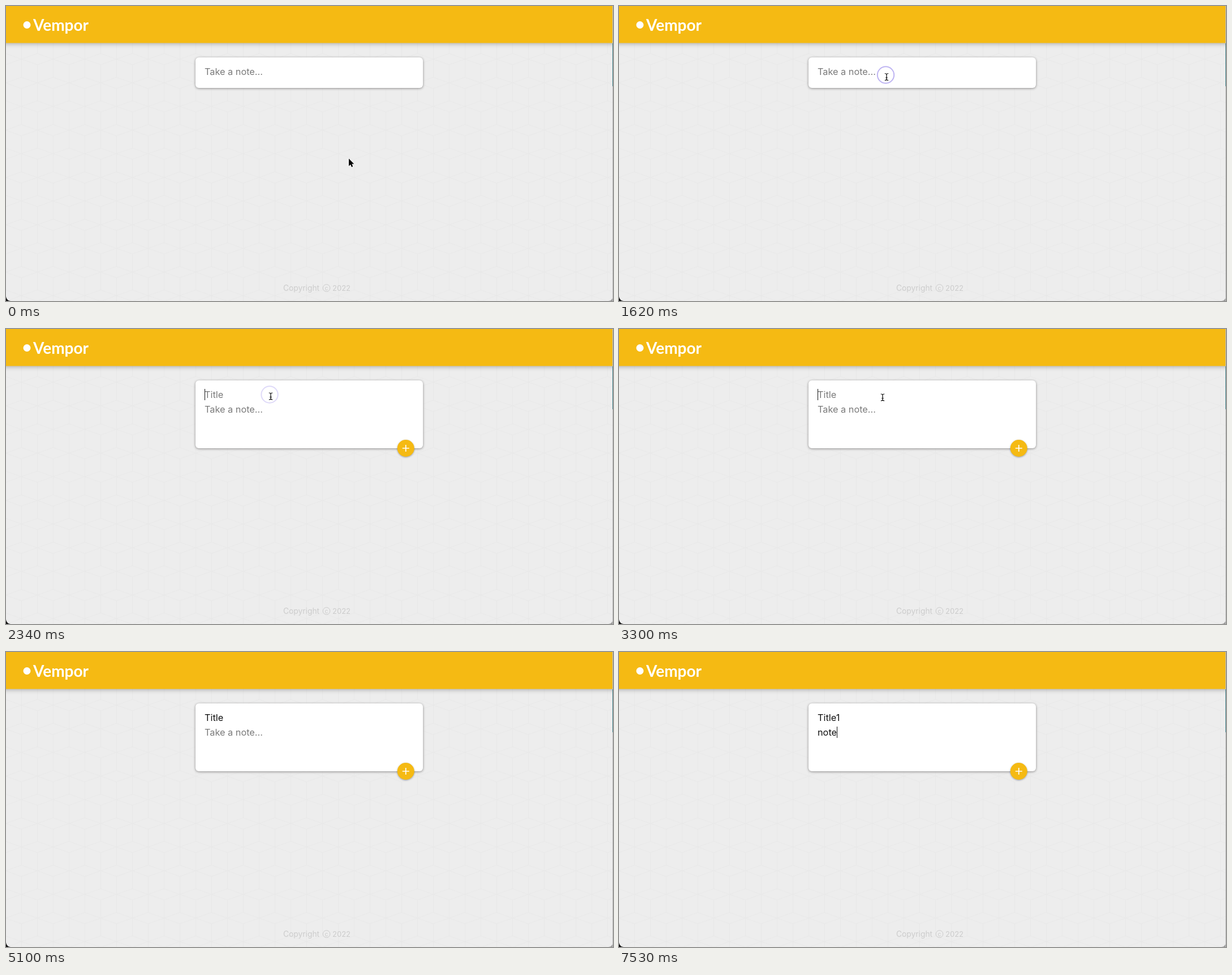
An HTML page for the animation above (8000 ms loop, 1073 by 522 pixels).

```html
<!DOCTYPE html>
<html lang="en">
<head>
<meta charset="utf-8">
<title>Notes</title>
<style>
  html, body { margin: 0; width: 100%; height: 100%; overflow: hidden; background: #ededed; }
  svg { display: block; width: 1073px; height: 522px; }
  text { font: 16.3px Inter, "Open Sans", sans-serif; white-space: pre; }
  .brand { font: 700 28px Lato, sans-serif; fill: #fff; }
  .foot text { font-size: 13.8px; fill: #ccc; }
  #header { filter: drop-shadow(0 1px 4px rgba(0,0,0,.3)); }
  #card { filter: drop-shadow(0 1px 2px rgb(138,137,137)); }
  #add circle { filter: drop-shadow(0 1px 1.5px rgba(0,0,0,.35)); }
</style>
</head>
<body>
<svg viewBox="0 0 1073 522">
  <defs>
    <pattern id="cubes" x="27" y="79" width="56" height="83.7" patternUnits="userSpaceOnUse">
      <path d="M0 15L28.5 5 56 15 28.5 25ZM28.5 57L0 47M28.5 57L0 67M28.5 57L56 47M28.5 57L56 67
               M.5 0V47M.5 67V84M28.5 0V5M28.5 25V84" fill="none" stroke="#e8e8e8"/>
    </pattern>
  </defs>
  <rect width="1073" height="522" fill="#ededed"/>
  <rect width="1073" height="522" fill="url(#cubes)"/>
  <rect id="header" x="-10" y="-10" width="1093" height="75.5" fill="#f5ba13"/>
  <circle cx="37" cy="33.5" r="6.5" fill="#fff"/>
  <text class="brand" x="48" y="44">Vempor</text>

  <g class="foot">
    <text x="490" y="504">Copyright</text>
    <circle cx="566.5" cy="499" r="6.3" fill="none" stroke="#ccc"/>
    <text x="566.5" y="502.5" text-anchor="middle" style="font-size:10.5px">c</text>
    <text x="577" y="504" style="font-size:13px">2022</text>
  </g>
  <path d="M0 514Q1 521 8 522H0Z" fill="#111"/>
  <path d="M1073 514Q1072 521 1065 522H1073Z" fill="#999"/>
  <path d="M1072.5 0V522" stroke="#bbb"/>
  <path d="M1072.5 66V142" stroke="#3f7f86"/>

  <rect id="card" x="335" y="91" width="402" height="54" rx="6" fill="#fff"/>
  <text id="title" x="351" y="122"></text>
  <text id="note" x="351" y="148"></text>
  <rect id="caret" width="1" height="20" fill="#111"/>
  <g id="add">
    <circle r="15" fill="#f5ba13"/>
    <path d="M-6 0H6M0-6V6" stroke="#fff" stroke-width="1.7"/>
  </g>
  <circle id="ring" r="14.7" fill="#fff" fill-opacity=".5" stroke="#beb4f2" stroke-width="2"/>
  <path id="arrow" d="M0 0V13.2L3 10.5 5 15 7.2 14 5.3 9.6H9.3Z" fill="#000" stroke="#fff" stroke-width="1.1" paint-order="stroke"/>
  <g id="beam" fill="none">
    <path id="stem" d="M-3.2-6Q-.5-6 0-4.8Q.5-6 3.2-6M-3.2 6Q-.5 6 0 4.8Q.5 6 3.2 6M0-5V5M-1.7 1.5H1.7" stroke="#fff" stroke-width="3"/>
    <use href="#stem" style="stroke:#000"/>
    <path d="M-3.2-6Q-.5-6 0-4.8Q.5-6 3.2-6M-3.2 6Q-.5 6 0 4.8Q.5 6 3.2 6M0-5V5M-1.7 1.5H1.7" stroke="#000" stroke-width="1.2"/>
  </g>
</svg>
<script>
const LOOP = 8000, STEP = 80;
const $ = id => document.getElementById(id);
const show = (el, on) => el.style.display = on ? '' : 'none';
const clamp = v => Math.max(0, Math.min(1, v));
const latest = (keys, t) => keys.filter(k => k[0] <= t).pop();

// [time, x, y]; no position means hidden
const pointer = [
  [0, 606, 270], [160, 833, 275], [240],
  [740, 800, 196], [820, 690, 182], [900, 585, 167], [980, 509.5, 152], [1060, 486, 146],
  [1140, 475, 130], [1300, 474, 127], [1380, 473, 125.5],
  [2180, 471, 123], [2260, 468, 119], [3060, 466, 121], [3620],
  [6010, 466, 121], [6090, 460, 130], [6170, 450, 143], [6250, 439, 154], [6330, 432, 160], [6810]
];
// [time, x, y, steps]
const clicks = [[1540, 471.5, 122, 7], [2340, 466, 116, 7], [6410, 430.5, 156, 6]];
const carets = [
  [0, ''], [1700, 'note'], [2100, ''], [2340, 'title'], [2900, ''], [3300, 'title'],
  [5100, ''], [5350, 'title'], [5850, ''], [6410, 'note']
];
const fields = {
  title: { text: 'Title1', keys: [3540, 4030, 4190, 4440, 4600, 5350], hint: 'Title' },
  note: { text: 'note', keys: [6890, 7050, 7370, 7530], hint: 'Take a note...' }
};
const OPEN = 1700;

function drawField(id, t) {
  const { text, keys, hint } = fields[id], el = $(id);
  const typed = text.slice(0, keys.filter(k => k <= t).length);
  el.textContent = typed || hint;
  el.setAttribute('fill', typed ? '#111' : '#7a7a7a');
  return typed ? el.getComputedTextLength() : 0;
}

function draw(t) {
  const open = t >= OPEN;
  $('card').setAttribute('height', open ? 120 : 54);
  show($('title'), open);
  $('note').setAttribute('y', open ? 148 : 122);
  const width = { title: drawField('title', t), note: drawField('note', t) };

  const focus = latest(carets, t)[1];
  show($('caret'), focus);
  if (focus) {
    $('caret').setAttribute('x', Math.round(351 + width[focus]));
    $('caret').setAttribute('y', focus === 'title' ? 106 : 132);
  }

  const zoom = clamp(Math.floor((t - OPEN) / STEP) / 3);
  $('add').setAttribute('transform', `translate(706.7 211) scale(${1 - (1 - zoom) ** 2})`);

  const click = clicks.find(([on, , , n]) => t >= on && t < on + n * STEP);
  show($('ring'), click);
  if (click) {
    const [on, x, y, n] = click, i = Math.floor((t - on) / STEP);
    $('ring').setAttribute('transform', `translate(${x} ${y})`);
    $('ring').setAttribute('opacity', clamp(Math.min((i + 1) / 2, (n - i) / 3)));
  }

  const [, x, y] = latest(pointer, t);
  const overCard = x > 335 && x < 737 && y > 91 && y < (open ? 211 : 145);
  show($('arrow'), x && !overCard);
  show($('beam'), x && overCard);
  if (x) $(overCard ? 'beam' : 'arrow').setAttribute('transform', `translate(${x} ${y})`);
}

function frame() {
  draw(performance.now() % LOOP);
  requestAnimationFrame(frame);
}
frame();
</script>
</body>
</html>
```
